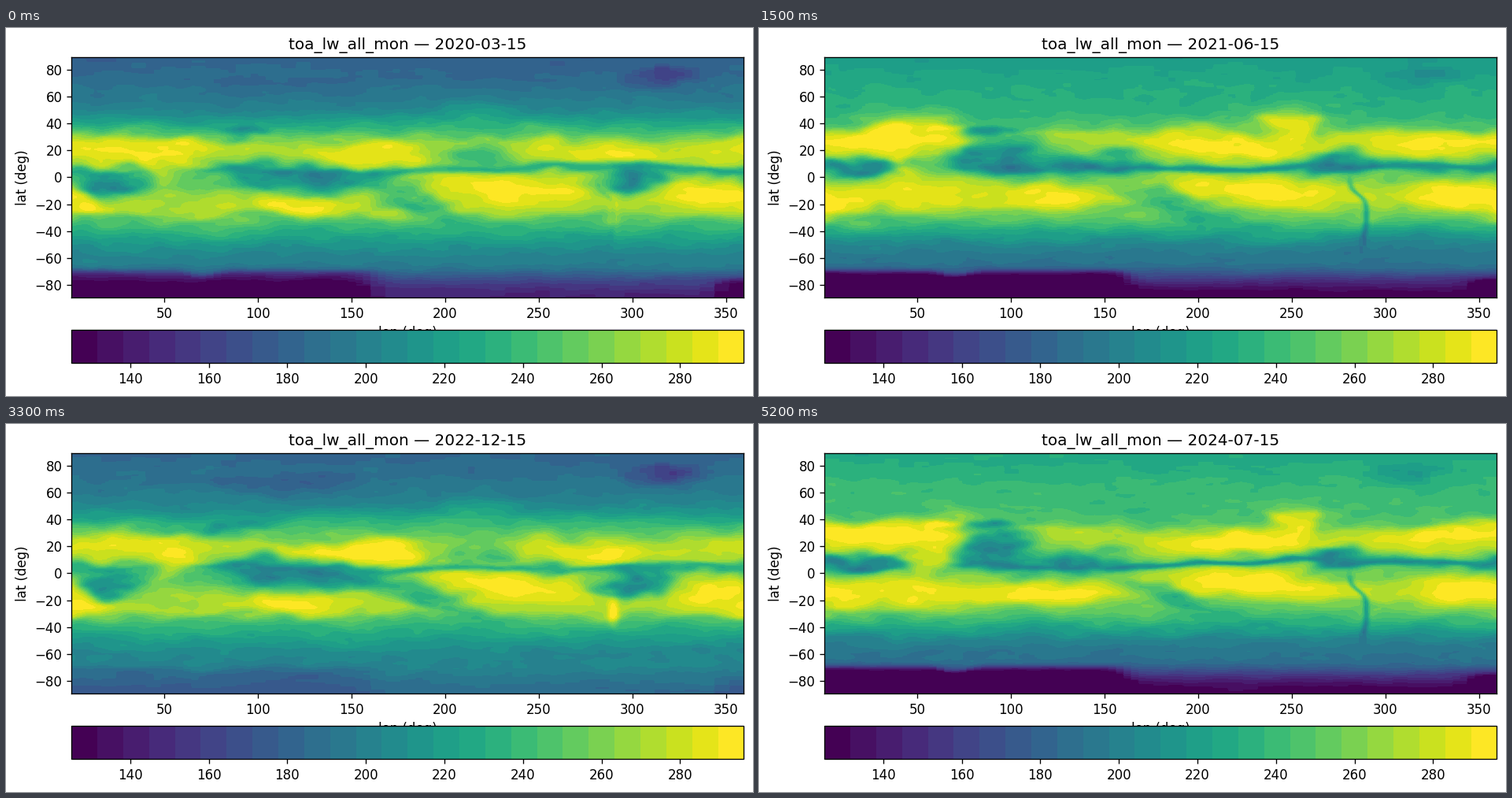
These frames come from a looping animation (949x467 px, 5300 ms). A matplotlib script:

```python
import numpy as np
import matplotlib.pyplot as plt
from matplotlib.animation import FuncAnimation

W, H, DPI = 949, 467, 120
FRAMES, INTERVAL = 53, 100
VMIN, VMAX = 125.04, 296.25

rng = np.random.default_rng(20)
lon = np.arange(0.5, 360, dtype=np.float32)
lat = np.arange(89.5, -90, -1, dtype=np.float32)
X, Y = np.meshgrid(lon, lat)


def noise(sx, sy):
    """Smooth random field of unit spread, periodic in longitude."""
    fy = np.fft.fftfreq(180)[:, None]
    fx = np.fft.rfftfreq(360)[None, :]
    keep = np.exp(-2 * np.pi ** 2 * ((fx * sx) ** 2 + (fy * sy) ** 2))
    f = np.fft.irfft2(np.fft.rfft2(rng.normal(size=X.shape)) * keep, s=X.shape)
    return (f / f.std()).astype(np.float32)


def patch(x, y, cx, cy, sx, sy, tilt=0):
    """Flat-topped oval; tilt is degrees of latitude per degree of longitude."""
    dx = (x - cx + 180) % 360 - 180
    dy = y - cy - tilt * dx
    return np.exp(-((dx / sx) ** 2 + (dy / sy) ** 2) ** 1.3)


def step(v):
    return 1 / (1 + np.exp(-np.clip(v, -30, 30)))


def cycle(t, peak):
    return float(np.cos(2 * np.pi * (t - peak) / 12))


LAND_X, LAND_Y = 3 * noise(5, 3), 1.2 * noise(5, 2.5)
LAND = noise(3, 1.5)
NORTH = step((Y - 41) / 7)

# High southern plateau and the mountain chain near 290 degrees east
coast = -70 - 4 * patch(X, 0, 70, 0, 9, 1)
PLATEAU = step((coast - Y) / 1.1) * step((160 - X) / 3)
PLATEAU += step((-76 - Y) / 1.1) * step((X - 347) / 3)
ridge = 281 + 9 * step((-13 - Y) / 2.5) - 2 * step((-42 - Y) / 3)
RIDGE = np.exp(-((X - ridge) / 1.6) ** 2) * step((-3 - Y) / 2) * step((Y + 48) / 4)


def zonal(y, t, s):
    """Mean flux by latitude, with the polar seasons lagging the sun."""
    f = np.interp(y, [-90, -70, -60, -50, -40, -28, 28, 40, 50, 60, 90],
                  [185, 202, 199, 212, 232, 256, 256, 235, 220, 214, 200])
    f = f.astype(np.float32) + 28 * cycle(t, 7.6) * NORTH
    f -= 8 * s * np.exp(-((y + 53) / 16) ** 2)
    cold = np.clip((cycle(t, 6.3) + 1) / 1.2, 0, 1)
    f -= cold * (38 * step((-70 - Y) / 3) + 24 * step((-79 - Y) / 3))
    return f - (12 + 30 * cold) * PLATEAU


def flux(month):
    t = month % 12
    s = cycle(t, 6.9)
    summer, winter = max(s, 0), max(-s, 0)
    x = X + LAND_X + 4 * noise(12, 6)
    y = Y + LAND_Y + 1.3 * noise(14, 6)
    f = zonal(y, t, s)
    moist = np.zeros_like(X)

    def dry(strength, *shape):
        f[:] += (298 - f) * strength * patch(x, y, *shape)

    def wet(strength, *shape):
        cover = strength * patch(x, y, *shape)
        f[:] += (196 - f) * cover
        moist[:] = np.maximum(moist, cover)

    # Subtropical belts follow the sun
    north, south = 20 + 5 * s, -17 + 5 * s
    for centre in (north, south):
        f += (282 - f) * 0.6 * np.exp(-((y - centre) / 10) ** 4)

    # Deserts and clear skies over the northern lands and seas
    dry(0.8 + 0.2 * s, 28, 20 + 9 * summer, 50, 9 + 2 * summer)
    dry(0.6, 50, 10, 10, 14)
    dry(0.9 * summer, 58, 40, 17, 7)
    dry(0.5 + 0.4 * abs(s), 165 + 55 * summer, north - 1, 45, 8)
    dry(0.6 + 0.2 * s, 250, 30 + 8 * s, 12, 10)
    dry(0.7, 285 + 40 * summer, 16 + 10 * summer, 32, 9)

    # Clear skies over the southern oceans and lands
    dry(0.85, 232, -8, 55, 11, -0.08)
    dry(0.85, 342, -13, 26, 11)
    dry(0.8, 8, -24, 14, 9)
    dry(0.7 * summer, 40, -15, 55, 11)
    dry(0.8, 122, south - 2, 30, 9)

    # Convection: rain band, oceans, continents and monsoon
    arid = patch(X, Y, 55, 8, 20, 14)
    rain = (0.45 + 0.3 * summer) * np.exp(-((y - 5.5 - 2 * s) / 3.3) ** 2)
    f += (196 - f) * rain * (1 - arid)
    wet(0.45, 188, -20, 32, 9, -0.35)
    wet(0.4 * (1 - summer), 213, 14, 22, 9)
    wet(0.8, 20, -1 + 8 * s, 18, 9 - 4 * summer)
    wet(0.55 + 0.35 * abs(s), 112 - 16 * summer, 1 + 15 * summer,
        34 - 8 * summer, 11 + 3 * summer)
    wet(0.7, 142, 2 + 8 * s, 20, 9)
    wet(0.85, 300 - 28 * summer, -2 + 5 * s + 9 * summer, 18, 10 - 2 * summer)
    wet(0.7, 88, 34, 18, 5)

    # Mountains, ice and winter cold
    f -= (18 + 18 * s) * RIDGE
    f += 28 * winter * patch(X, y, 290, -29, 3, 11)
    f += 14 * (1 - summer) * patch(x, y, 215, 48, 25, 12)
    f -= (24 - 8 * s) * patch(x, y, 320, 74, 18, 7)
    f -= 15 * winter * patch(x, y, 110, 67, 45, 7)

    f += (1 + 3 * moist) * (LAND + noise(5, 2.5) + 0.7 * noise(2.5, 1.3))
    return widen_cells(f)


def widen_cells(f):
    """Double the grid cell width towards the poles."""
    for low, n in [(45, 2), (70, 4), (80, 8)]:
        rows = abs(lat) > low
        cells = f[rows].reshape(rows.sum(), -1, n).mean(axis=2)
        f[rows] = np.repeat(cells, n, axis=1)
    return f


def box(left, top, right, bottom):
    return [left / W, 1 - bottom / H, (right - left) / W, (bottom - top) / H]


def title(i):
    month = i + 2
    return f"toa_lw_all_mon — {2020 + month // 12}-{month % 12 + 1:02d}-15"


fields = [flux(i + 3) for i in range(FRAMES)]

plt.rcParams["font.family"] = "DejaVu Sans"
fig = plt.figure(figsize=((W + 0.01) / DPI, (H + 0.01) / DPI), dpi=DPI)
ax = fig.add_axes(box(83.2, 36.9, 937.4, 342.0))
image = ax.imshow(fields[0], extent=(0.5, 359.5, -89.5, 89.5), aspect="auto",
                  cmap=plt.get_cmap("viridis", 26), vmin=VMIN, vmax=VMAX)
ax.set_xlabel("lon (deg)")
ax.set_ylabel("lat (deg)")
ax.set_yticks(range(-80, 81, 20))
heading = ax.set_title(title(0))

bar_ax = fig.add_axes(box(83.2, 383.2, 937.4, 425.4))
bar = fig.colorbar(image, cax=bar_ax, orientation="horizontal")
bar.set_ticks(range(140, 281, 20))


def draw(i):
    image.set_data(fields[i])
    heading.set_text(title(i))
    return image, heading


anim = FuncAnimation(fig, draw, frames=FRAMES, interval=INTERVAL,
                     repeat=True, repeat_delay=0, blit=False)
plt.show()
```
